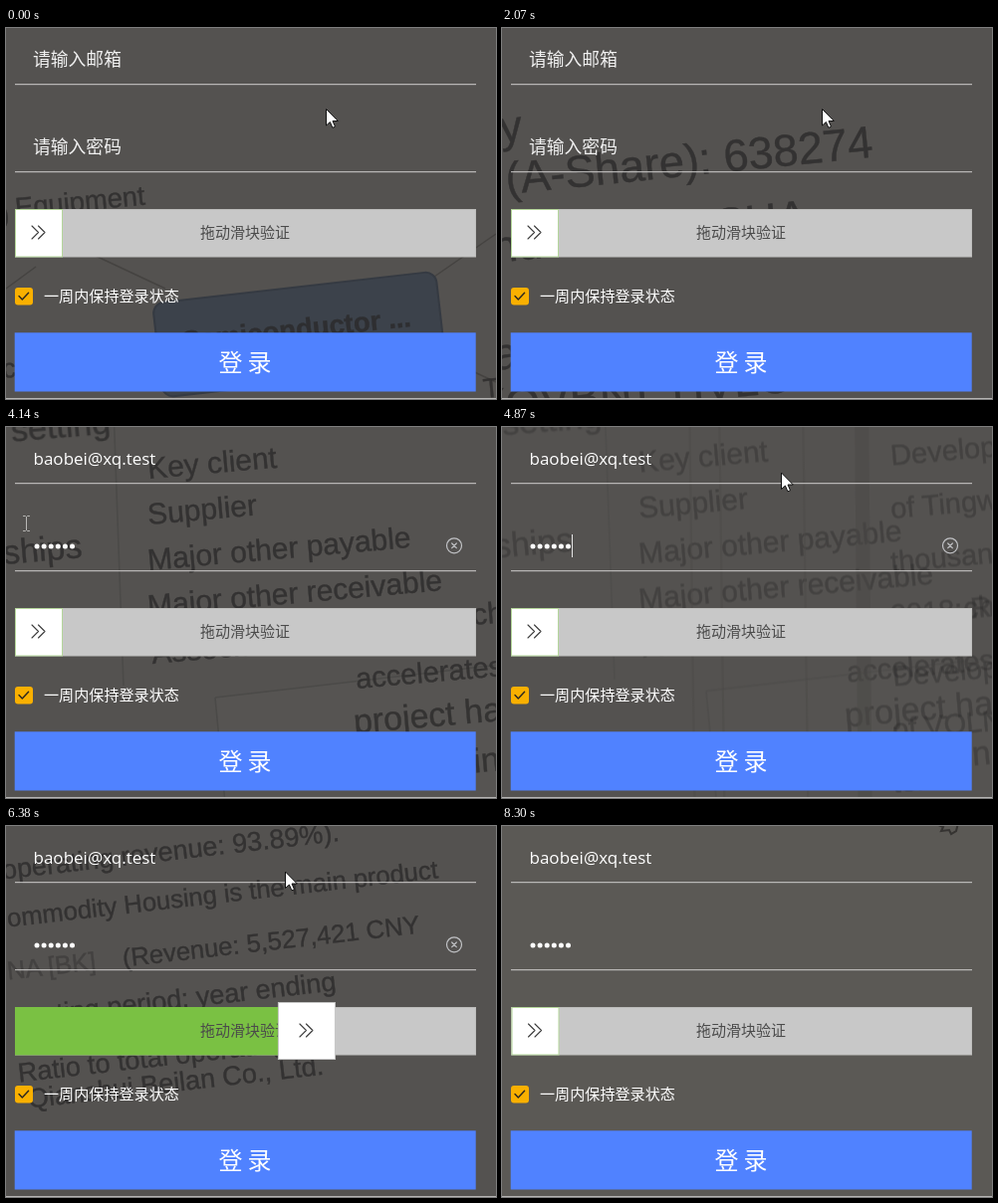
These frames come from a looping animation (492 by 373 pixels, 8.4 s). An HTML page:

```html
<!DOCTYPE html>
<html lang="zh-CN">
<head>
<meta charset="utf-8">
<title>登录</title>
<style>
html, body { margin: 0; width: 100%; height: 100%; overflow: hidden; background: #545250; }
svg { display: block; width: 492px; height: 373px; }
text { white-space: pre; }
#ui text { font-family: "Noto Sans CJK SC", "Noto Sans", sans-serif; }
#ui .email { font: 500 17px "Open Sans", "Noto Sans", sans-serif; }
#scenes text { font-family: "Liberation Sans", Arial, sans-serif; fill: #2a2929; stroke: #2a2929; stroke-width: .4; opacity: .76; }
.line { fill: none; stroke-linecap: round; stroke-linejoin: round; }
</style>
</head>
<body>
<svg viewBox="0 0 492 373">
  <defs>
    <filter id="soft" x="-10%" y="-10%" width="120%" height="120%"><feGaussianBlur stdDeviation=".7"/></filter>
    <g id="clear" class="line" stroke="#c2c3c6" stroke-width="1.2">
      <circle r="7.5"/><path d="M-2.3-2.3 2.3 2.3M2.3-2.3-2.3 2.3"/>
    </g>
  </defs>
  <rect width="492" height="373" fill="#545250"/>
  <g id="scenes" filter="url(#soft)"></g>

  <g id="ui">
    <path d="M9 56.7H472M9 144.7H472" stroke="#cfcecd"/>
    <text id="mailHint" x="27" y="38" font-size="17.8" fill="#f1f1f1">请输入邮箱</text>
    <text id="mail" class="email" x="27.5" y="38" fill="#fff"></text>
    <text id="passHint" x="27" y="126" font-size="17.8" fill="#f1f1f1">请输入密码</text>
    <g id="dots" fill="#fff"></g>
    <rect id="caret" width="1" height="23" fill="#e4e4e4"/>
    <use id="mailClear" href="#clear" x="450" y="31.3"/>
    <use id="passClear" href="#clear" x="450" y="119.3"/>

    <rect x="9.5" y="182.5" width="462" height="47.5" fill="#c8c8c8" stroke="#bdbdbb"/>
    <rect id="fill" x="9" y="182" height="48.4" fill="#7ac143"/>
    <text id="hint" x="240" y="211" font-size="15" text-anchor="middle" fill="#4b4b4b">拖动滑块验证</text>
    <text id="passed" x="240" y="210" font-size="15" font-weight="500" text-anchor="middle" fill="#fff">验证通过</text>
    <g id="knob">
      <rect id="face" fill="#fff"/>
      <path id="arrows" class="line" stroke="#3c3c3c" stroke-width="1.1" d="M-7-7-.5-.5-7 6M-.5-7 6-.5-.5 6"/>
      <g id="ok">
        <circle r="10.7" fill="#7ac143"/>
        <path class="line" stroke="#fff" stroke-width="1.8" d="M-4.5 0-1.2 3.4 4.8-3"/>
      </g>
    </g>

    <rect x="9" y="261" width="18" height="17.5" rx="3" fill="#f9b000"/>
    <path class="line" stroke="#2b2720" stroke-width="1.4" d="M13 269.5 16.3 273 22.6 266.2"/>
    <text x="38" y="275" font-size="15.1" font-weight="500" fill="#fff">一周内保持登录状态</text>

    <rect x="8.7" y="306.3" width="463" height="59.2" fill="#5082ff"/>
    <text x="213.5" y="345" font-size="24" font-weight="500" letter-spacing="5" fill="#fff">登录</text>
    <rect y="372" width="492" height="1" fill="#b4b3b2"/>

    <path id="arrow" d="M0 0V16.5L3.9 13 6.4 18.8 9 17.7 6.5 12H11.8Z" fill="#fff" stroke="#111"/>
    <path id="beam" class="line" stroke="#b9b8b6" d="M-3-7.5H-1L0-6.5 1-7.5H3M0-6.5V6.5M-3 7.5H-1L0 6.5 1 7.5H3"/>
  </g>
</svg>
<script>
const LOOP = 8400, STEP = 8300 / 60, FADE = 2;
const $ = id => document.getElementById(id);
const clamp = (v, a = 0, b = 1) => Math.min(b, Math.max(a, v));
const show = (id, on) => $(id).setAttribute('visibility', on ? 'visible' : 'hidden');
const set = (id, attrs) => { for (const k in attrs) $(id).setAttribute(k, attrs[k]); };
const move = (id, x, y) => set(id, { transform: `translate(${x} ${y})` });

const word = (tilt, size, weight = 400) => (s, x, y) =>
  `<text transform="translate(${x} ${y}) rotate(${tilt})" font-size="${size}" font-weight="${weight}">${s}</text>`;
const stroke = (d, color, width = 1.5) => `<path d="${d}" fill="none" stroke="${color}" stroke-width="${width}"/>`;
const panel = (d, color) => `<path d="${d}" fill="${color}"/>`;
const column = (put, x, y, gap, lines) => lines.map((s, i) => put(s, x, y + i * gap)).join('');

const graph = word(-5.5, 27.4), label = word(-6, 27.5, 700), code = word(-5.8, 45),
  list = word(-4.5, 26), head = word(-4, 37, 700), note = word(-4, 29),
  menu = word(-5, 30), big = word(-5, 34), side = word(-5, 29),
  report = word(-6.5, 25.6), wide = word(-6.5, 27);

// start: first step shown; at: step where the drawn position holds; v: drift per step
const scenes = [
  { start: 0, at: 0, v: [-1.2, .8], art:
    stroke('M60 215 160 262M430 250 492 207M0 262 30 240M436 330 492 356', '#454341') +
    '<rect transform="translate(147 277) rotate(-6.5)" width="286" height="95" rx="11" fill="#3c424b" stroke="#353a42" stroke-width="2"/>' +
    graph(')', -5, 197) + graph('Equipment', 10, 190) +
    label('Semiconductor ...', 178, 324) + graph('c', -3, 352) + graph('T', 480, 372) },
  { start: 9, at: 15, v: [-1.5, -1], art:
    code('ny', -26, 118) + code('(A-Share): 638274', 5, 167) +
    code('nd Market: SHA', -8, 236) + code('a', -7, 344) + code('(QVBN): HVLO', -10, 396) },
  { start: 18, at: 22, v: [-1, -1.2], art:
    panel('M352-30H530V400H358Z', '#514f4c') + stroke('M351-30 357 400', '#494744', 2) +
    list('y', -8, 50) + list('nvestment', -6, 94) + list('tment', 0, 141) + list('or', -10, 190) +
    list('(top 10)', -40, 241) + list('op 10 of tradable shares)', 4, 272) + list('ber associates', -8, 376) +
    head('uoshen T', 355, 153) + note('A suit', 402, 238) + note('roject has', 358, 289) + note('roject best', 358, 381) },
  { start: 26, at: 30, v: [-1, -1.3], art:
    panel('M210 272 530 235V420H222Z', '#565452') + stroke('M108-20 118 260M210 272 222 400M210 272 530 235', '#4b4a48') +
    big('setting', 6, 15) + big('ships', -2, 138) +
    column(menu, 143, 52, 46, ['Key client', 'Supplier', 'Major other payable', 'Major other receivable']) +
    menu('Associated', 147, 238) + menu('ch', 469, 199) +
    side('accelerates', 352, 263) + big('project has', 350, 308) + big('n in', 442, 350) },
  { start: 35, at: 40, v: [-.8, -1.1], art:
    panel('M350-40H364L368 420H354Z', '#4b4946') + stroke('M184-40 190 420M214-40 220 420M298-40 304 420', '#4d4b48', 2) +
    column(side, 387, 33, 53.5, ['Develop', 'of Tingwo', 'thousand', '2018: RMB']) +
    column(side, 389, 255, 53.5, ['Develop', 'of VOLN', 'ter of']) },
  { start: 44, at: 51, v: [-1, -.9], art:
    wide('operating revenue: 93.89%).', -8, 49) + report('ommodity Housing is the main product', -3, 97) +
    `<g opacity=".5">${report('NA [BK]', -3, 150)}</g>` + report('(Revenue: 5,527,421 CNY', 113, 137) +
    wide('erating period: year ending', 8, 197) + wide('Ratio to total operating', 8, 253) +
    wide('Qianshui Beilan Co., Ltd.', 18, 279) },
  { start: 50, fade: 6, at: 60, v: [0, -.6], art:
    panel('M-20-20H520V400H-20Z', '#5b5955') +
    stroke('M436-2 443 1 441 5 449 4 451 8 456 5 458-3', '#353331', 2) }
];
$('scenes').innerHTML = scenes.map((s, i) => `<g id="scene${i}">${s.art}</g>`).join('');
$('dots').innerHTML = Array.from({ length: 6 }, (_, i) =>
  `<circle cx="${31 + i * 7.1}" cy="120" r="2.5"/>`).join('');

const EMAIL = 'baobei@xq.test';

const entered = (s, n) => clamp((n - s.start + 1) / (s.fade || FADE));

function drawScenes(n) {
  scenes.forEach((s, i) => {
    const next = scenes[i + 1];
    const fadeIn = i ? entered(s, n) : 1;
    const fadeOut = next ? 1 - entered(next, n) : 1;
    const d = n - s.at;
    set('scene' + i, { opacity: Math.min(fadeIn, fadeOut) });
    move('scene' + i, s.v[0] * d, s.v[1] * d);
  });
}

function drawFields(n) {
  const chars = clamp((n - 17) * 4, 0, EMAIL.length);
  const dots = clamp((n - 26) * 2, 0, 6);
  const inMail = n >= 18 && n < 26, inPass = n >= 26 && n < 58;
  $('mail').textContent = EMAIL.slice(0, chars);
  show('mailHint', !chars);
  show('passHint', !dots);
  [...$('dots').children].forEach((c, i) => c.setAttribute('visibility', i < dots ? 'visible' : 'hidden'));
  show('mailClear', inMail && chars);
  show('passClear', inPass && dots);
  const since = n - (n >= 40 ? 40 : n >= 26 ? 26 : 21);
  show('caret', (inMail || inPass) && (since < 0 || since % 8 < 4));
  set('caret', inMail
    ? { x: Math.round(28 + $('mail').getComputedTextLength()) - 1, y: 19 }
    : { x: 28 + dots * 7, y: 108 });
}

function drawSlider(n) {
  const held = n >= 39 && n < 55, done = n >= 50 && n < 55;
  const p = clamp((n - 40) / 10);
  const x = held ? 415 * p * p * (3 - 2 * p) : 0;
  const half = held ? 28.5 : 23.5;
  move('knob', 33 + x + (n >= 55 ? .5 : 0), 206);
  set('face', { x: -half, y: held ? -28.5 : -23.5, width: half * 2, height: held ? 57 : 47.5,
    stroke: held ? '#c6c6c6' : '#b5d79b' });
  set('fill', { width: x });
  show('arrows', !done);
  show('ok', done);
  show('hint', !done);
  show('passed', done);
}

function drawPointer(n) {
  const beam = n >= 18 && n < 35;
  show('beam', beam);
  show('arrow', !beam && n < 58);
  move('beam', 20.5, n < 26 ? 10 : 97);
  if (n < 18) move('arrow', 321.5, 81.5);
  else move('arrow', 280.5, 46);
}

const origin = performance.now();
let last = -1;
function tick() {
  const t = (performance.now() - origin) % LOOP;
  const n = Math.min(60, Math.floor((t + 20) / STEP));
  if (n !== last) {
    last = n;
    [drawScenes, drawFields, drawSlider, drawPointer].forEach(draw => draw(n));
  }
  requestAnimationFrame(tick);
}
tick();
</script>
</body>
</html>
```
